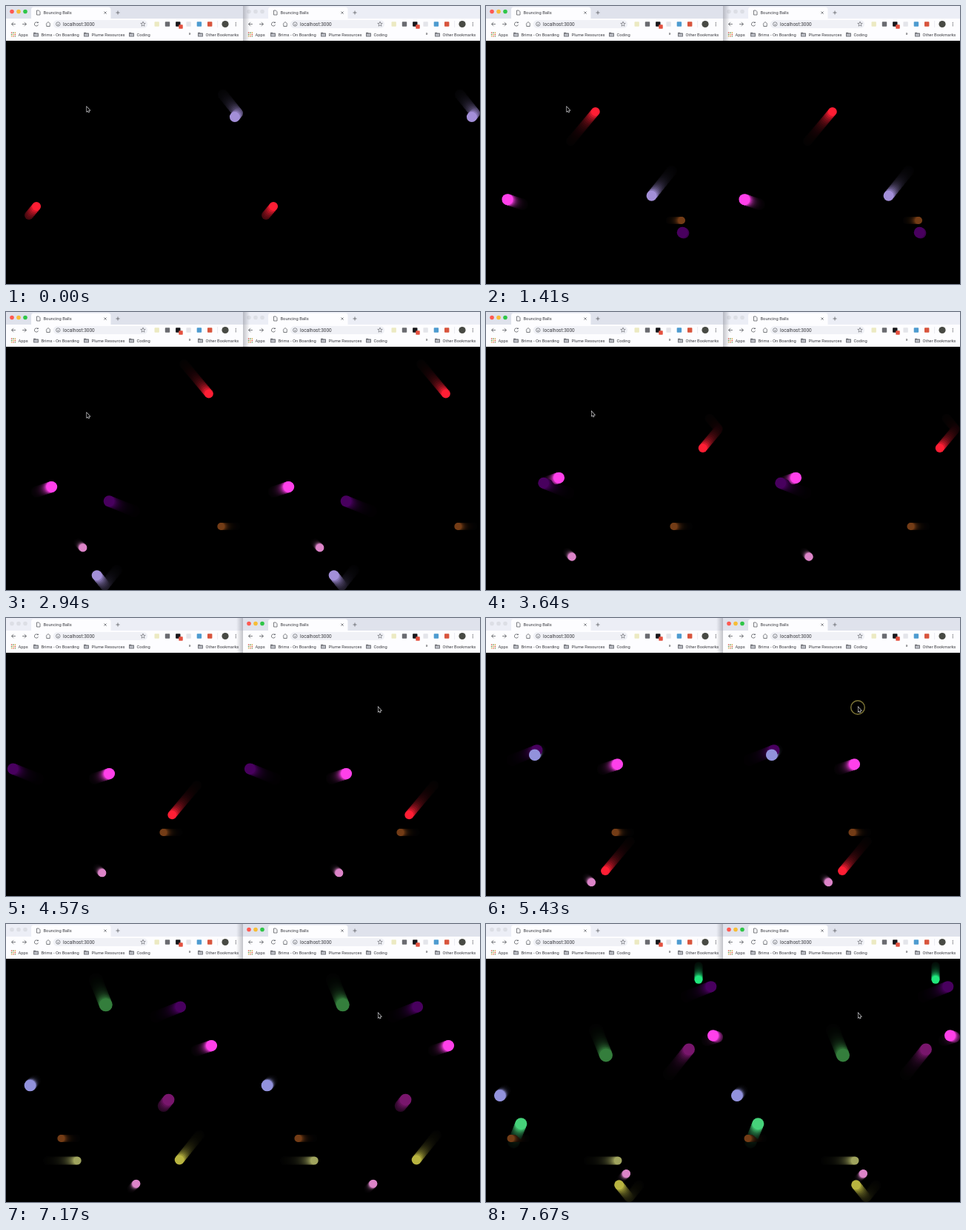
Write an HTML page with a canvas that moves like this. It is 640 px wide and 376 px high and loops after 7.69 s.

```html
<!DOCTYPE html>
<html lang="en">
<head>
<meta charset="utf-8">
<title>Bouncing Balls</title>
<style>
  html, body { margin: 0; width: 100%; height: 100%; overflow: hidden; background: #000; }
  #stage { position: relative; width: 640px; height: 376px; overflow: hidden; }
  canvas { position: absolute; left: 0; top: 0; width: 640px; height: 376px; }
  span {
    position: absolute; white-space: nowrap;
    font: 5.8px/8px Roboto, Inter, sans-serif; color: #3c3d42;
  }
</style>
</head>
<body>
<div id="stage"><canvas id="view"></canvas></div>
<script>
const LOOP = 7690, W = 320, H = 376, BAR = 47;
const TRAIL = 20, FADE = 'rgba(0, 0, 0, 0.19)';
const INK = '#5b5d63', PAPER = '#fdfdff';
const stage = document.getElementById('stage');
const canvas = document.getElementById('view');
const ctx = canvas.getContext('2d');
const dpr = Math.max(1, window.devicePixelRatio || 1);
canvas.width = 2 * W * dpr;
canvas.height = H * dpr;

const pace = [
  [0, 0], [1410, 64], [2230, 112.5], [2330, 112.5], [3150, 149], [3640, 176.5],
  [5430, 255.5], [6550, 322.5], [7115, 351], [7670, 396.5]
];
const pointer = [[3500, 109, 136.5], [3640, 142, 134.5], [4300, 502.5, 120.5]];

// velocities are whole thirds of a pixel per tick
const balls = [];
const add = (color, r, born, x, y, vx, vy, died = Infinity) =>
  balls.push({ color, r, born, x, y, vx: vx / 3, vy: vy / 3, died });

add('#ff1e34', 6, -6, 31, 283, 5, -6, 264);
add('#a38fd8', 7, -18, 293, 120, 4, 5, 152);
add('#ff40ea', 7.5, 30, 63, 273, -3, -1);
add('#733c16', 5, 48, 248, 290, 3, 0);
add('#48005e', 7.5, 63, 267, 307, -5, -2);
add('#dc84c8', 5.5, 86, 86, 301, 1, 1);
add('#9292dc', 7.8, 225, 76, 175, -1, 1);
add('#347e3c', 9, 296, 95, 98, 2, -5);
add('#b8b440', 6.5, 298, 311, 223, -4, 5);
add('#a0a45e', 5.5, 312, 9, 320, 6, 0);
add('#78166c', 8, 350, 212, 247, 4, -5);
add('#46d27a', 8, 381, 37, 296, 2, -5);
add('#20e67c', 5.5, 382, 287, 56, 0, 4);

function track(keys, t) {
  const next = keys.findIndex(k => k[0] > t);
  if (next < 1) return (next ? keys.at(-1) : keys[0]).slice(1);
  const a = keys[next - 1], b = keys[next];
  const k = (t - a[0]) / (b[0] - a[0]);
  return a.slice(1).map((v, i) => v + (b[i + 1] - v) * k);
}

// reflect v between two walls
function fold(v, lo, hi) {
  const span = hi - lo, m = (((v - lo) % (2 * span)) + 2 * span) % (2 * span);
  return lo + (m > span ? 2 * span - m : m);
}

function disc(x, y, r, fill) {
  ctx.fillStyle = fill;
  ctx.beginPath();
  ctx.arc(x, y, r, 0, Math.PI * 2);
  ctx.fill();
}

function rect(x, y, w, h, fill, r = 0) {
  ctx.fillStyle = fill;
  ctx.beginPath();
  ctx.roundRect(x, y, w, h, r);
  ctx.fill();
}

function square(x, y, side, fill) {
  rect(x - side / 2, y - side / 2, side, side, fill, 0.8);
}

function line(points, close = false, color = INK, width = 0.8) {
  ctx.strokeStyle = color;
  ctx.lineWidth = width;
  ctx.beginPath();
  points.forEach(([x, y]) => ctx.lineTo(x, y));
  if (close) ctx.closePath();
  ctx.stroke();
}

function ring(x, y, r, color = INK, width = 0.7, from = 0, to = Math.PI * 2) {
  ctx.strokeStyle = color;
  ctx.lineWidth = width;
  ctx.beginPath();
  ctx.arc(x, y, r, from, to);
  ctx.stroke();
}

// replay the last ticks, dimming the picture before each one
function drawBalls(tick) {
  rect(0, 0, W, H, '#000');
  for (let u = tick - TRAIL; u < tick + 0.5; u++) {
    rect(0, 0, W, H, FADE);
    for (const b of balls) {
      const age = u - b.born;
      if (age < 0 || u >= b.died) continue;
      disc(fold(b.x + b.vx * age, b.r, W - b.r), fold(b.y + b.vy * age, 45 + b.r, H + 0.5 - b.r), b.r, b.color);
    }
  }
}

function folder(x, y) {
  rect(x - 3.5, y - 2.8, 3.2, 2, '#75777d', 0.5);
  rect(x - 3.5, y - 2, 7, 5, '#75777d', 0.6);
  rect(x - 2.5, y - 0.7, 5, 2.7, '#bfc1c8');
}

function arrow(x, y, dir) {
  line([[x - 2.7 * dir, y], [x + 2.7 * dir, y]]);
  line([[x, y - 2.5], [x + 2.7 * dir, y], [x, y + 2.5]]);
}

function star(x, y, r) {
  line(Array.from({ length: 10 }, (_, i) => {
    const a = -Math.PI / 2 + i * Math.PI / 5, q = i % 2 ? r * 0.42 : r;
    return [x + q * Math.cos(a), y + q * Math.sin(a)];
  }), true, INK, 0.6);
}

function shade(from, to) {
  const g = ctx.createLinearGradient(from, 0, to, 0);
  g.addColorStop(0, 'rgba(60, 62, 75, 0.3)');
  g.addColorStop(1, 'rgba(60, 62, 75, 0)');
  rect(Math.min(from, to), 0, Math.abs(to - from), BAR, g);
}

function drawBar(active) {
  // tab strip
  rect(0, 0, W, BAR, active ? '#dfe2ec' : '#eceef6');
  ['#ff5a52', '#f6bd36', '#2fc648'].forEach((c, i) => disc(8 + i * 9, 7.5, 2.8, active ? c : '#dcdee5'));
  rect(34, 1.5, 107.5, 20, PAPER, 3.5);
  rect(0, 17, W, BAR - 17, PAPER);
  line([[41.5, 6], [44.3, 6], [46, 7.8], [46, 12], [41.5, 12]], true);
  for (const s of [-1.6, 1.6]) line([[134.1 - s, 7.5], [134.1 + s, 10.7]]);
  line([[148.5, 9], [153.5, 9]]);
  line([[151, 6.5], [151, 11.5]]);

  // navigation
  const y = 24.5;
  arrow(10.2, y, -1);
  arrow(24.8, y, 1);
  ring(41, y, 2.6, INK, 0.8, 0.3, 5.5);
  square(43, 22.4, 1.8, INK);
  line([[53.8, y], [57, y - 3], [60.2, y]]);
  line([[54.8, y], [54.8, y + 3], [59.2, y + 3], [59.2, y]]);
  rect(64, y - 5.5, 127, 11, '#f0f1f6', 5.5);
  ring(70.3, y, 2.7);
  line([[70.3, y - 0.4], [70.3, y + 1.7]]);
  star(185, y, 3.4);

  // extension buttons, one every 14.3 px
  ['#eceac2', '#6a6b70', '#17171b', '#e4e5ea', '#4d9bd0', '#d8543c'].forEach((c, i) =>
    square(203.7 + i * 14.3, y, 6.4, c));
  square(236, 28, 5.5, '#e4503f');
  rect(285.5, 20, 0.6, 9, '#dcdee5');
  disc(296, y, 4.6, '#484a44');
  for (const i of [-1, 0, 1]) disc(310.3, y + i * 2.2, 0.65, INK);

  // bookmarks
  const dots = ['#df5a50', '#6c9c5b', '#d6a846'];
  for (let i = 0; i < 9; i++) {
    const row = Math.floor(i / 3);
    square(7.6 + (i % 3) * 2.4, 36.2 + row * 2.4, 1.7, dots[(i + row) % 3]);
  }
  [40.5, 108.5, 169.5, 262.5].forEach(x => folder(x, 38.5));
}

function drawCursor(t) {
  const [x, y] = track(pointer, t);
  if (t > 5250 && t < 6900) ring(502, 121, 9.3, '#7e7636', 1.4);
  const shape = [[0, 0], [0, 6.2], [1.4, 5], [2.3, 7.2], [3.3, 6.8], [2.4, 4.7], [4.3, 4.6]];
  line(shape.map(([a, b]) => [x + a, y + b]), true, '#e2e2e6', 1.1);
  ctx.fillStyle = '#080808';
  ctx.fill();
}

function label(text, x, y, size = 5.8) {
  for (const left of [x, x + W]) {
    const el = document.createElement('span');
    el.textContent = text;
    el.style.left = left + 'px';
    el.style.top = y - 4 + 'px';
    el.style.fontSize = size + 'px';
    stage.append(el);
  }
}

label('Bouncing Balls', 50.5, 8.8);
label('localhost:3000', 77, 24.5, 6.5);
label('Apps', 16.5, 38.6);
label('Brims - On Boarding', 47.5, 38.6);
label('Plume Resources', 115.5, 38.6);
label('Coding', 176.5, 38.6);
label('»', 246.5, 38.2, 6.5);
label('Other Bookmarks', 269.5, 38.6);

function draw(t) {
  ctx.setTransform(dpr, 0, 0, dpr, 0, 0);
  const [tick] = track(pace, t);
  const front = t < 4500 ? 0 : 1;
  for (const side of [0, 1]) {
    ctx.save();
    ctx.translate(side * W, 0);
    ctx.beginPath();
    ctx.rect(0, 0, W, H);
    ctx.clip();
    drawBalls(tick);
    drawBar(side === front);
    ctx.restore();
  }
  // the front window casts its shadow on the other one
  shade(W, front ? W - 9 : W + 9);
  drawCursor(t);
}

const start = performance.now();
function frame() {
  draw((performance.now() - start) % LOOP);
  requestAnimationFrame(frame);
}
frame();
</script>
</body>
</html>
```
